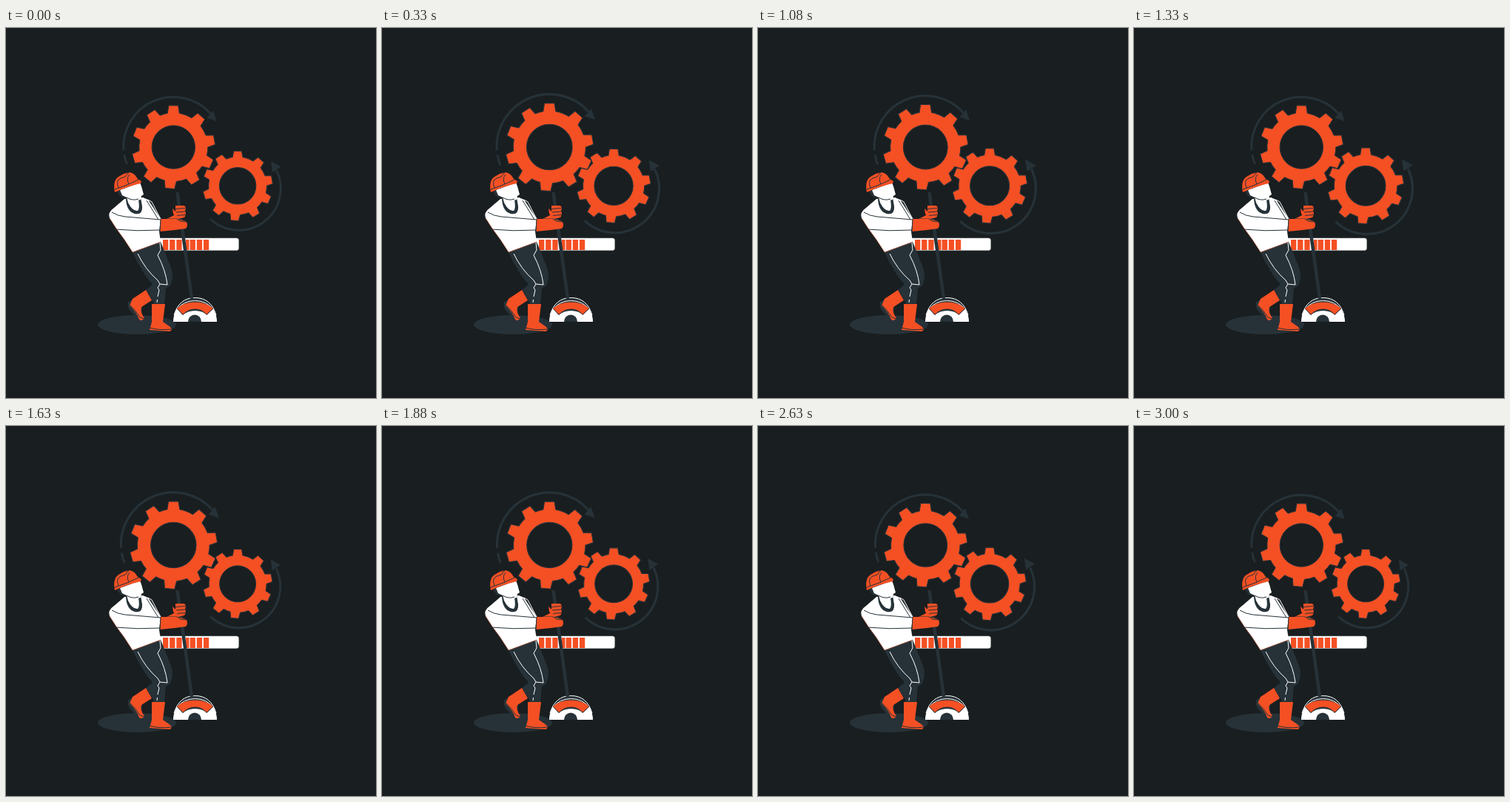
An HTML page for the animation above (3040 ms loop, 500x500 px).

```html
<!DOCTYPE html>
<html lang="en">
<head>
<meta charset="utf-8">
<title>Worker and gears</title>
<style>
  html, body { margin: 0; width: 100%; height: 100%; overflow: hidden; background: #191e20; }
  svg { display: block; width: 100vw; height: 100vh; }
  .d { fill: #263238; }
  .o { fill: #f45024; }
  .w { fill: #fff; }
  .line { fill: none; stroke: #263238; stroke-width: 1; stroke-linejoin: round; }
  .seam { fill: none; stroke: #fff; stroke-width: 1; stroke-linejoin: round; }
  .arrow { fill: none; stroke: #263238; stroke-width: 3; }
  .gear { fill: #f45024; stroke: #263238; fill-rule: evenodd; stroke-linejoin: round; }
</style>
</head>
<body>
<svg viewBox="0 0 500 500">
  <ellipse class="d" cx="177" cy="401" rx="53" ry="13"/>

  <g id="big">
    <path class="arrow" d="M-67.500 4A67.500 67.500 0 0 1 50 -45.500M-66.500 10Q-65.500 17-63 23"/>
    <path class="d" d="M58.500 -35L45-39.500 53.500-49.500Z"/>
    <path class="gear"/>
  </g>
  <g id="small">
    <path class="arrow" d="M-37 44A56 56 0 0 0 52-21"/>
    <path class="d" d="M44.500 -33L58-25.500 46.500-18Z"/>
    <path class="gear"/>
  </g>

  <!-- progress bar -->
  <rect x="205" y="284" width="109.500" height="16.600" rx="3" fill="#fff" stroke="#b9bec0" stroke-width=".5"/>
  <g id="cells" class="o"></g>

  <!-- lever and its base -->
  <path class="d" d="M226 397A29.500 33 0 0 1 285 397Z"/>
  <path class="seam" d="M227 388Q234 364.500 255.500 364.500T284 388M230 381Q240 368.500 255.500 368.500T281 381"/>
  <path class="w" d="M226 397Q226 388 231 379L239 388 271 388 280 379Q285 388 285 397Z"/>
  <path class="w" d="M238 388Q246 382 255.500 382T273 388Z"/>
  <path class="o" d="M231 379Q240 370.500 255.500 370.500T280 379L271 387.500Q265 380 255.500 380T239 387.500Z"/>
  <path class="line" d="M231 379L239 387.500Q246 380 255.500 380T271 387.500L280 379"/>
  <path class="d" d="M246 397A9 9.500 0 0 1 264 397Z"/>
  <path d="M231.500 222L251 366" fill="none" stroke="#263238" stroke-width="4.500"/>

  <!-- legs -->
  <path class="d" d="M171 303L209 289 222 321Q228 335 222 348L216 352 214 374H199L201 350Q184 332 171 303Z"/>
  <path class="d" d="M187 326L207 347 199 370 189 354 198 347Z"/>
  <path class="seam" d="M178 305Q188 326 205 341L208 346 205 351 207 354 205 363M204.500 367L204 371M208 290L209 300 205 307Q216 328 218 347L208 346"/>
  <path class="d" d="M189 354L171 367 165 370Q163 377 169 384L181 395Z"/>
  <path class="o" d="M189 354L197 368 183 377Q181 384 187 392Q184 397 180 394Q176 383 167 375L171 366Z"/>
  <path class="line" d="M167 374Q175 381 181 391L187 393"/>
  <path class="o" d="M197 373H215L212 397 222 404Q226 408 221 410L194 408 197 397Z"/>
  <path class="line" d="M194 405Q207 409 224 407"/>

  <!-- torso -->
  <path class="w" d="M160 231L146 243Q137 249 140 257L149 271 160 286 171 303 209 289 207 275 209 258 192 232 185 229Z"/>
  <path d="M140 257L149 271 160 286 171 303 209 289" fill="none" stroke="#c24628" stroke-width=".6"/>
  <path class="line" d="M143 249Q151 254 161 255L209 259M147 272Q178 275 209 273M190 233L206 259"/>
  <path class="seam" d="M192 232L197 235 209 258"/>
  <path class="d" d="M162 231Q163 248 174 251Q185 253 184 241L182 229Z"/>
  <path class="w" d="M162 224L165 236Q171 248 178 247Q181 245 179 232L176 223Z"/>

  <!-- head -->
  <path class="d" d="M150 221L155 228 161 230 160 216Z"/>
  <path class="w" d="M154 219L181 209 183 214 186 225 183 227 182 232Q174 235 165 230L161 228 157 226Z"/>
  <path class="line" d="M163 229Q171 234 179 231"/>
  <path class="o" d="M147 222Q144 206 152 201L159 197 167 195Q174 196 178 204L183 207 182 210Q164 214 147 222Z"/>
  <path class="line" d="M147 218Q163 213 179 205M152 216Q148 206 155 203L161 201 166 195M166 211Q162 203 167 198"/>

  <!-- gloves -->
  <path class="o" d="M217 258L229 252 234 254 233 260 220 260Z"/>
  <path class="o" d="M229 240H241Q244 243 242 247Q244 251 241 256L232 258 226 251 225 244 229 248Z"/>
  <path class="line" d="M229 244.500L242 243.500M230 249L242 248M231 253.500L242 252.500M218 258H232"/>
  <path class="o" d="M209 258L231 258 243 261Q247 266 243 271L228 273 208 275Z"/>
  <path class="line" d="M209 258L208 275M231 258L236 261 245 262"/>
</svg>
<script>
  const LOOP = 3040, STEP = LOOP / 73;
  const TEETH = [0, 42, 80, 114, 148, 185, 219, 254, 292, 327];
  // [seconds, growth] pairs of each double beat
  const BIG = [[0, 0], [.2, .1], [.5, 0], [.8, .1], [1.08, .026], [1.11, 0], [1.52, 0]];
  const SMALL = [[0, .01], [.06, 0], [.11, 0], [.31, .1], [.38, 0], [.57, .1], [.7, 0], [.73, 0], [.76, .01]];
  const find = q => document.querySelector(q);

  function gearPath(tip, root, hole) {
    const at = (r, deg) => {
      const a = deg * Math.PI / 180;
      return (r * Math.sin(a)).toFixed(2) + " " + (-r * Math.cos(a)).toFixed(2);
    };
    const ring = TEETH.map((a, i) =>
      (i ? `A${root} ${root} 0 0 1 ` : "M") +
      `${at(root, a - 10)}L${at(tip, a - 6.5)}L${at(tip, a + 6.5)}L${at(root, a + 10)}`).join("");
    return ring + `A${root} ${root} 0 0 1 ${at(root, -10)}Z` +
      `M${hole} 0A${hole} ${hole} 0 1 0 ${-hole} 0A${hole} ${hole} 0 1 0 ${hole} 0Z`;
  }

  function beat(keys, t) {
    t %= keys[keys.length - 1][0];
    const i = keys.findIndex(k => k[0] > t);
    const [t0, v0] = keys[i - 1], [t1, v1] = keys[i];
    return 1 + v0 + (v1 - v0) * (t - t0) / (t1 - t0);
  }

  find("#big .gear").setAttribute("d", gearPath(56.5, 46.5, 29.2));
  find("#small .gear").setAttribute("d", gearPath(47, 39, 24.5));
  find("#cells").innerHTML = Array.from({ length: 7 }, (_, i) =>
    i === 3 ? `<rect x="243" y="286" width="4.500" height="14"/>`
            : `<rect x="${212 + 9.15 * i}" y="286" width="7.300" height="14"/>`).join("");

  const place = (id, x, y, s) => find(id).setAttribute("transform", `translate(${x} ${y}) scale(${s})`);

  function draw() {
    const ms = performance.now() % LOOP;
    const t = Math.floor((ms + 4) / STEP) * STEP / 1000;
    place("#big", 226.3, 161, beat(BIG, t));
    place("#small", 313.1, 213.3, beat(SMALL, t));
    requestAnimationFrame(draw);
  }
  draw();
</script>
</body>
</html>
```
